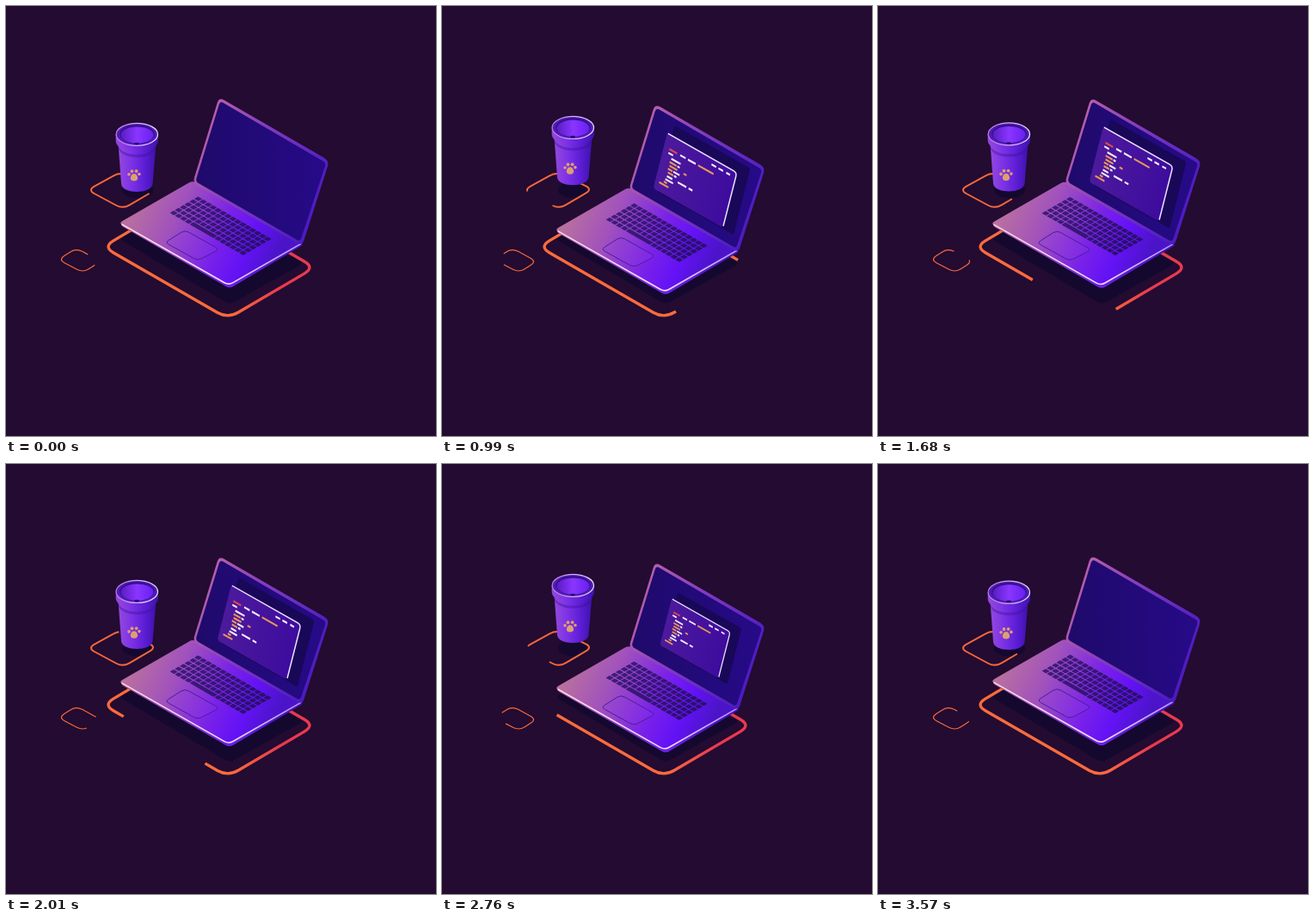
Recreate the animation shown at these times as an HTML page. Size 500x500 px, loop 3.63 s.

```html
<!DOCTYPE html>
<html lang="en">
<head>
<meta charset="utf-8">
<title>Floating laptop and cup</title>
<style>
  html, body { margin: 0; width: 100%; height: 100%; overflow: hidden; background: #230b31; }
  svg { display: block; width: 100vw; height: 100vh; }
  .trail { fill: none; stroke: #f8683c; stroke-dasharray: 800 200; }
</style>
</head>
<body>
<svg viewBox="0 0 500 500">
  <defs>
    <linearGradient id="trailInk" gradientUnits="userSpaceOnUse" x1="262" y1="0" x2="318" y2="0">
      <stop stop-color="#fb6b3c"/><stop id="trailEnd" offset="1"/>
    </linearGradient>
    <linearGradient id="deck" gradientUnits="userSpaceOnUse" x1="150" y1="225" x2="312" y2="298">
      <stop stop-color="#b9709f"/><stop offset=".3" stop-color="#a051bd"/>
      <stop offset=".6" stop-color="#7a22e8"/><stop offset=".8" stop-color="#6412f6"/>
      <stop offset="1" stop-color="#4b14c8"/>
    </linearGradient>
    <linearGradient id="edge" gradientUnits="userSpaceOnUse" x1="134" y1="0" x2="345" y2="0">
      <stop stop-color="#ffd9e0"/><stop offset=".6" stop-color="#f3dcff"/><stop offset="1" stop-color="#b78bff"/>
    </linearGradient>
    <linearGradient id="side" gradientUnits="userSpaceOnUse" x1="134" y1="0" x2="345" y2="0">
      <stop stop-color="#a85a9c"/><stop offset=".6" stop-color="#6a20e8"/><stop offset="1" stop-color="#3d10b4"/>
    </linearGradient>
    <linearGradient id="frame" gradientUnits="userSpaceOnUse" x1="222" y1="150" x2="372" y2="220">
      <stop stop-color="#bb62a8"/><stop offset=".4" stop-color="#853cc0"/><stop offset="1" stop-color="#4a1ac0"/>
    </linearGradient>
    <linearGradient id="screen" gradientUnits="userSpaceOnUse" x1="225" y1="0" x2="370" y2="0">
      <stop stop-color="#1f0a6b"/><stop offset="1" stop-color="#260a88"/>
    </linearGradient>
    <linearGradient id="keyInk" gradientUnits="userSpaceOnUse" x1="0" y1="6" x2="12" y2="0">
      <stop stop-color="#431c7c"/><stop offset="1" stop-color="#2a106e"/>
    </linearGradient>
    <linearGradient id="pane" x2="1">
      <stop stop-color="#4c1a9c"/><stop offset="1" stop-color="#3d0c9e"/>
    </linearGradient>
    <linearGradient id="cupBody" x2="1">
      <stop stop-color="#9449dc"/><stop offset=".35" stop-color="#7c32e6"/>
      <stop offset=".7" stop-color="#5c1dd4"/><stop offset="1" stop-color="#3d12ac"/>
    </linearGradient>
    <linearGradient id="cupInside" x2="1">
      <stop stop-color="#5a1cc4"/><stop offset=".5" stop-color="#8a35ff"/><stop offset="1" stop-color="#6820f0"/>
    </linearGradient>
    <linearGradient id="rim" x2="1">
      <stop stop-color="#c07ae0"/><stop offset=".6" stop-color="#dcb6ff"/><stop offset="1" stop-color="#f0e0ff"/>
    </linearGradient>
  </defs>

  <path id="laptopShadow" fill="#14082f"/>
  <ellipse cx="153" cy="214" rx="18" ry="9.5" fill="#14082f"/>
  <path id="bigTrail" class="trail" pathLength="1000" stroke-width="3.4" style="stroke:url(#trailInk)"/>
  <path id="cupTrail" class="trail" pathLength="1000" stroke-width="1.9"/>
  <path id="smallTrail" class="trail" pathLength="1000" stroke-width="1.2"/>

  <g id="laptop">
    <path id="base" fill="url(#side)"/>
    <path id="top" fill="url(#deck)"/>
    <path d="M135 254 L254 321.7 Q259 324.5 264 321.6 L342.5 276.7" fill="none" stroke="url(#edge)" stroke-width="1.6" stroke-linecap="round"/>
    <g id="keys" fill="url(#keyInk)" transform="matrix(5.75 3.32 -5.67 3.27 223.5 221)"/>
    <path id="trackpad" fill="#8a3ae8" fill-opacity=".25" stroke="#4c1ca0"/>
    <path id="lid" fill="url(#frame)"/>
    <path id="display" fill="url(#screen)"/>
    <g transform="matrix(.9 .51 -.245 .965 262 139.5)">
      <g id="editor">
        <rect x="6" y="-12" width="98" height="80" rx="3" fill="#190758"/>
        <rect width="90" height="67" rx="4" fill="url(#pane)"/>
        <path d="M1 .5 H86 Q90 .5 90 5 V65" fill="none" stroke="#efe2ff" stroke-width="1.5"/>
        <g id="code" stroke-width="2.2"/>
      </g>
    </g>
  </g>

  <g id="cup">
    <path d="M130.5 160 L134 207 C135 219 169 219 170.5 207 L174.5 160Z" fill="url(#cupBody)"/>
    <path d="M130.6 163 C136 176 169 176 174.3 163 L174 167 C168 179 137 179 131 167Z" fill="#3d1199" opacity=".4"/>
    <path d="M127.7 149 V157 C129 174 175 174 177 157 V149Z" fill="url(#cupBody)"/>
    <ellipse cx="152.3" cy="149.3" rx="24.2" ry="13" fill="#4f1db4" stroke="url(#rim)" stroke-width="1.2"/>
    <ellipse cx="152.5" cy="149" rx="20.3" ry="10.8" fill="#34108e"/>
    <ellipse cx="152.5" cy="150" rx="19" ry="9.6" fill="url(#cupInside)"/>
    <ellipse cx="152" cy="160" rx="3" ry="1.3" fill="#240b68"/>
    <g fill="#dda06c" transform="translate(-.3 .8)">
      <path d="M149.2 194.3 C152 194.3 154 198 153.2 200.5 C152 203.5 146.5 203.5 145.3 200.5 C144.5 198 146.5 194.3 149.2 194.3Z"/>
      <circle cx="143.3" cy="195" r="1.8"/><circle cx="146.8" cy="191.3" r="1.9"/>
      <circle cx="151.9" cy="191.2" r="1.9"/><circle cx="155.2" cy="194.7" r="1.8"/>
    </g>
  </g>
</svg>
<script>
const LOOP = 3630, FLOAT = LOOP / 2;
const el = id => document.getElementById(id);
const clamp = x => Math.min(1, Math.max(0, x));
const smooth = x => (x = clamp(x), x * x * (3 - 2 * x));

function add(parent, tag, attrs) {
  const node = document.createElementNS('http://www.w3.org/2000/svg', tag);
  for (const name in attrs) node.setAttribute(name, attrs[name]);
  parent.append(node);
}

// Closed polygon with rounded corners, beginning just after its first corner.
function polygon(id, radius, ...points) {
  const toward = (a, b) => {
    const k = radius / Math.hypot(b[0] - a[0], b[1] - a[1]);
    return [a[0] + (b[0] - a[0]) * k, a[1] + (b[1] - a[1]) * k];
  };
  const n = points.length;
  let d = 'M' + toward(points[0], points[1]);
  for (let i = 1; i <= n; i++) {
    const p = points[i % n];
    d += `L${toward(p, points[i - 1])}Q${p} ${toward(p, points[(i + 1) % n])}`;
  }
  el(id).setAttribute('d', d + 'Z');
}

polygon('laptopShadow', 6, [132, 271], [216, 225], [346, 299], [260, 347]);
polygon('bigTrail', 14, [359, 304], [258, 363.4], [113, 280], [214, 220]);
polygon('cupTrail', 9, [95, 214], [136, 236], [175, 213], [133, 193]);
polygon('smallTrail', 8, [110, 297], [89.5, 310], [61, 295], [81.5, 281.5]);
polygon('base', 5, [132, 254.5], [217, 206], [347, 277], [260, 328.5]);
polygon('top', 5, [131, 252.5], [217, 203], [347, 274.5], [259, 325.5]);
polygon('trackpad', 5, [185, 275], [208, 260.5], [248, 283], [223, 296]);
polygon('lid', 7, [217, 206], [247.7, 106], [376, 180], [344.5, 279]);
polygon('display', 4, [220.3, 204], [249, 110.5], [372.3, 182.5], [342, 274]);

for (let row = 0; row < 6; row++) {
  for (let col = 0; col < 15; col++) {
    const isSpace = row === 5 && col === 4;
    add(el('keys'), 'rect', { x: col + .08, y: row + .1, width: isSpace ? 4.84 : .84, height: .8, rx: .12 });
    if (isSpace) col += 4;
  }
}

// Code lines: y, then colour, start and end of each dash.
const INK = { w: '#f6e9ff', o: '#e9975a', r: '#e2474f' };
const lines = `7 w59-65 w68-74 w78-83|16 r7-17 w21-28 w31-41 o44-64|20.5 w7-13|25 w12-24
|29.5 o11-20 w21-24|33.5 o12-22 o30-34|37.5 o11-17 w18-26|41.5 o12-19 w20-23
|46 w12-19 w26-37 w40-45|50 w11-21|53.5 o10-14|57 o5-17`;
for (const line of lines.split('|')) {
  const [y, ...dashes] = line.trim().split(' ');
  for (const dash of dashes) {
    const [from, to] = dash.slice(1).split('-');
    add(el('code'), 'path', { d: `M${from} ${y}H${to}`, stroke: INK[dash[0]] });
  }
}

const moveTrail = (id, turn) => el(id).setAttribute('stroke-dashoffset', -1000 * turn);

function draw(now) {
  const t = now % LOOP;
  const lift = 4 - 4 * Math.cos(2 * Math.PI * t / FLOAT);
  el('laptop').setAttribute('transform', `translate(0 ${lift})`);
  el('cup').setAttribute('transform', `translate(0 ${-lift})`);

  moveTrail('bigTrail', t / LOOP - .114);
  moveTrail('cupTrail', t / FLOAT - .372);
  moveTrail('smallTrail', t / FLOAT);
  const red = smooth((Math.abs(t - 780) - 250) / 400);
  el('trailEnd').setAttribute('stop-color', `rgb(${251 - 17 * red},${107 - 50 * red},${60 + 18 * red})`);

  const open = smooth((t - 480) / 320) * (1 - smooth((t - 2680) / 320));
  el('editor').setAttribute('transform', `translate(45 33.5) scale(${open}) translate(-45 -33.5)`);
  el('editor').setAttribute('visibility', open > .01 ? 'visible' : 'hidden');
}

const start = performance.now();
function tick() {
  draw(performance.now() - start);
  requestAnimationFrame(tick);
}
tick();
</script>
</body>
</html>
```
